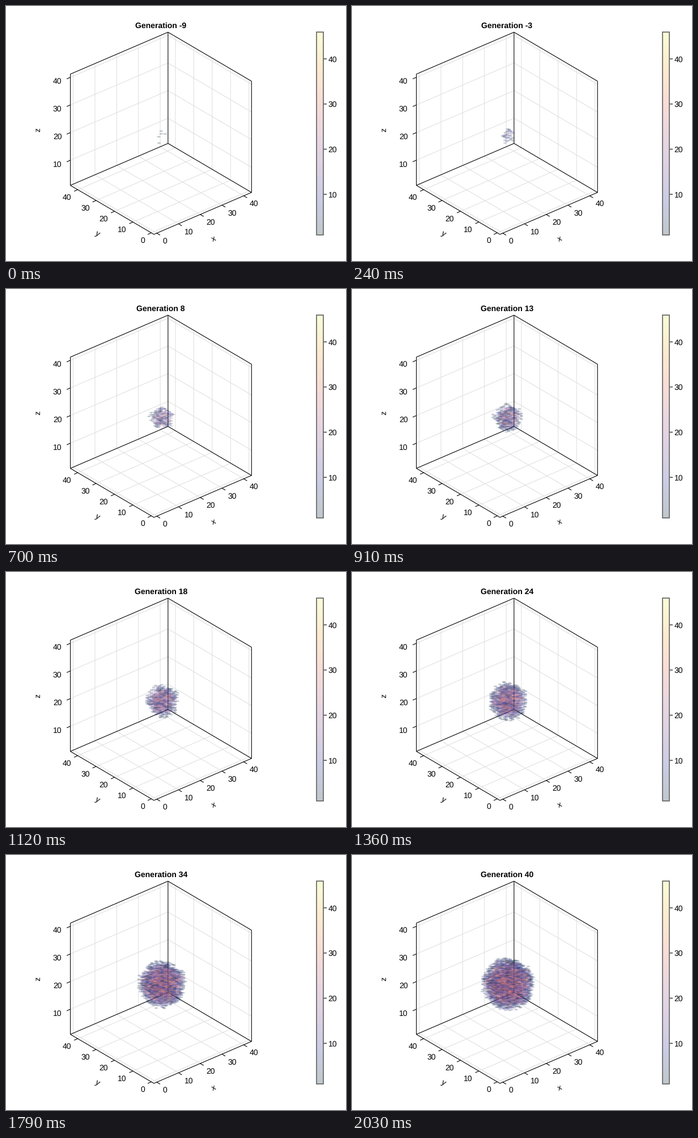
A matplotlib script that plays this animation: 600x450 px, repeating every 2090 ms.

```python
import numpy as np
import matplotlib.pyplot as plt
from matplotlib.animation import FuncAnimation
from matplotlib.collections import EllipseCollection
from matplotlib.colors import LinearSegmentedColormap

W, H, DPI = 600, 450, 100
PX = 72 / DPI
LOOP, TICK = 2090, 10
STEPS, FIRST_GEN = 50, -9
ALPHA = 0.25

plt.rcParams["font.family"] = "Liberation Sans"
plt.rcParams["text.hinting"] = "none"
fig = plt.figure(figsize=(W / DPI, H / DPI), dpi=DPI, facecolor="white")
ax = fig.add_axes([0, 0, 1, 1])
ax.set_axis_off()

thermal = LinearSegmentedColormap.from_list(
    "thermal", ["#042333", "#2c3395", "#744992", "#b15f82",
                "#eb7958", "#fbb43d", "#e8fa5b"])

# Orthographic box: front bottom corner and its three edges in pixels
ORIGIN = np.array([261.0, 403.0])
EDGES = np.array([[172.3, -74.0], [-147.4, -86.5], [0.0, -196.3]])
LOW = np.array([-1.3, -1.4, 0.9])
SPAN = np.array([44.9, 45.4, 40.25])


def box(*frac):
    return ORIGIN + np.asarray(frac, float) @ EDGES


def project(cells):
    return ORIGIN + (cells - LOW) / SPAN @ EDGES


def line(*pts, color="black", lw=1.1, z=2):
    x, y = np.array(pts).T
    ax.plot(x, y, color=color, lw=lw * PX, zorder=z,
            solid_capstyle="butt", snap=False)


def label(x, y, s, **kw):
    return ax.text(x, y, s, fontsize=14 * PX, **kw)


def draw_box():
    grid = dict(color="#dedede", lw=1, z=1)
    for v in range(0, 41, 10):
        fx, fy, fz = (v - LOW) / SPAN
        line(box(fx, 0, 0), box(fx, 1, 0), box(fx, 1, 1), **grid)
        line(box(0, fy, 0), box(1, fy, 0), box(1, fy, 1), **grid)
        px, py = box(fx, 0, 0)
        line((px, py), (px + 6, py + 3.5))
        label(px + 10.5, py + 18.3, str(v))
        px, py = box(0, fy, 0)
        line((px, py), (px - 6.4, py + 2.8))
        label(px - 11.5, py + 17.3, str(v), ha="right")
        if v:
            line(box(0, 1, fz), box(1, 1, fz), box(1, 0, fz), **grid)
            px, py = box(0, 1, fz)
            line((px, py), (px - 6.4, py + 2.8))
            label(98.5, py + 11.3, str(v), ha="right")
    for z in (0, 1):
        line(box(0, 1, z), box(1, 1, z), box(1, 0, z))
    for x, y in ((0, 1), (1, 1), (1, 0)):
        line(box(x, y, 0), box(x, y, 1))
    line(box(0, 1, 0), box(0, 0, 0), box(1, 0, 0))
    mid = dict(ha="center", va="center")
    label(366.7, 411, "x", rotation=23, **mid)
    label(161, 402, "y", rotation=-30, **mid)
    label(56.5, 218, "z", rotation=90, **mid)


def draw_colorbar():
    left, right, top, bottom = 548, 560, 45.5, 404
    ramp = thermal(np.linspace(0, 1, 256))[:, None, :3]
    ax.imshow(1 - ALPHA * (1 - ramp), extent=(left, right, bottom, top),
              origin="lower", aspect="auto", interpolation="bilinear")
    ax.add_patch(plt.Rectangle((left, top), right - left, bottom - top,
                               fill=False, ec="#666666", lw=1.7 * PX))
    for v in (10, 20, 30, 40):
        y = bottom - (v - 1) / 45 * (bottom - top)
        line((right + 0.8, y), (right + 6, y))
        label(568.5, y + 5.2, str(v))


def grow():
    """Lattice cells back to front: place, step of birth, final value."""
    rng = np.random.default_rng(7)
    axis = np.arange(7, 36)
    cells = np.stack(np.meshgrid(axis, axis, axis), -1).reshape(-1, 3)
    d = (cells - np.array([21, 20.5, 20.6])) * [1, 1, 1.1]
    r = np.linalg.norm(d, axis=1)
    u = d / r[:, None]
    lumps = 0.25 * np.sin(4 * u[:, 0] + 5 * u[:, 2]) + 0.25 * np.sin(6 * u[:, 1] + 1)
    # late births leave gaps inside and a thin, ragged rim
    reach = r + lumps + rng.exponential(0.9, len(r)) - 0.3
    born = np.maximum(1, np.ceil((reach - 1.3) / 0.16))
    for seed in ((22, 20, 21), (21, 21, 21), (19, 20, 21),
                 (21, 21, 22), (20, 21, 18)):
        born[(cells == seed).all(axis=1)] = 0
    keep = born < STEPS
    cells, born = cells[keep], born[keep]
    order = np.lexsort((-cells[:, 0] - cells[:, 1], cells[:, 2]))
    peak = rng.uniform(0.1, 0.76, len(born))
    return project(cells[order]), born[order], peak


draw_box()
draw_colorbar()
ax.set_xlim(0, W)
ax.set_ylim(H, 0)
ax.set_aspect("auto")

title = label(273.2, 38.9, "", ha="center", weight="bold")
spots, born, peak = grow()
cloud = EllipseCollection([6.4], [2.6], [0], units="xy", offsets=spots[:1],
                          offset_transform=ax.transData, linewidths=0, zorder=4)
ax.add_collection(cloud, autolim=False)

# 24 steps per second, shown on a 33 Hz clock rounded to 10 ms
clock = np.floor(np.arange(STEPS) * 33 / 24 + 0.5)
starts = np.round(clock * 100 / 33) * 10


def update(i):
    step = np.searchsorted(starts, i * TICK, side="right") - 1
    alive = born <= step
    age = step - born[alive]
    colors = thermal(peak[alive] * (1 - np.exp(-age / 6)))
    colors[:, 3] = ALPHA
    cloud.set_offsets(spots[alive])
    cloud.set_facecolor(colors)
    title.set_text(f"Generation {FIRST_GEN + step}")
    return cloud, title


anim = FuncAnimation(fig, update, frames=LOOP // TICK, interval=TICK,
                     repeat=True, repeat_delay=0, blit=False)
plt.show()
```
